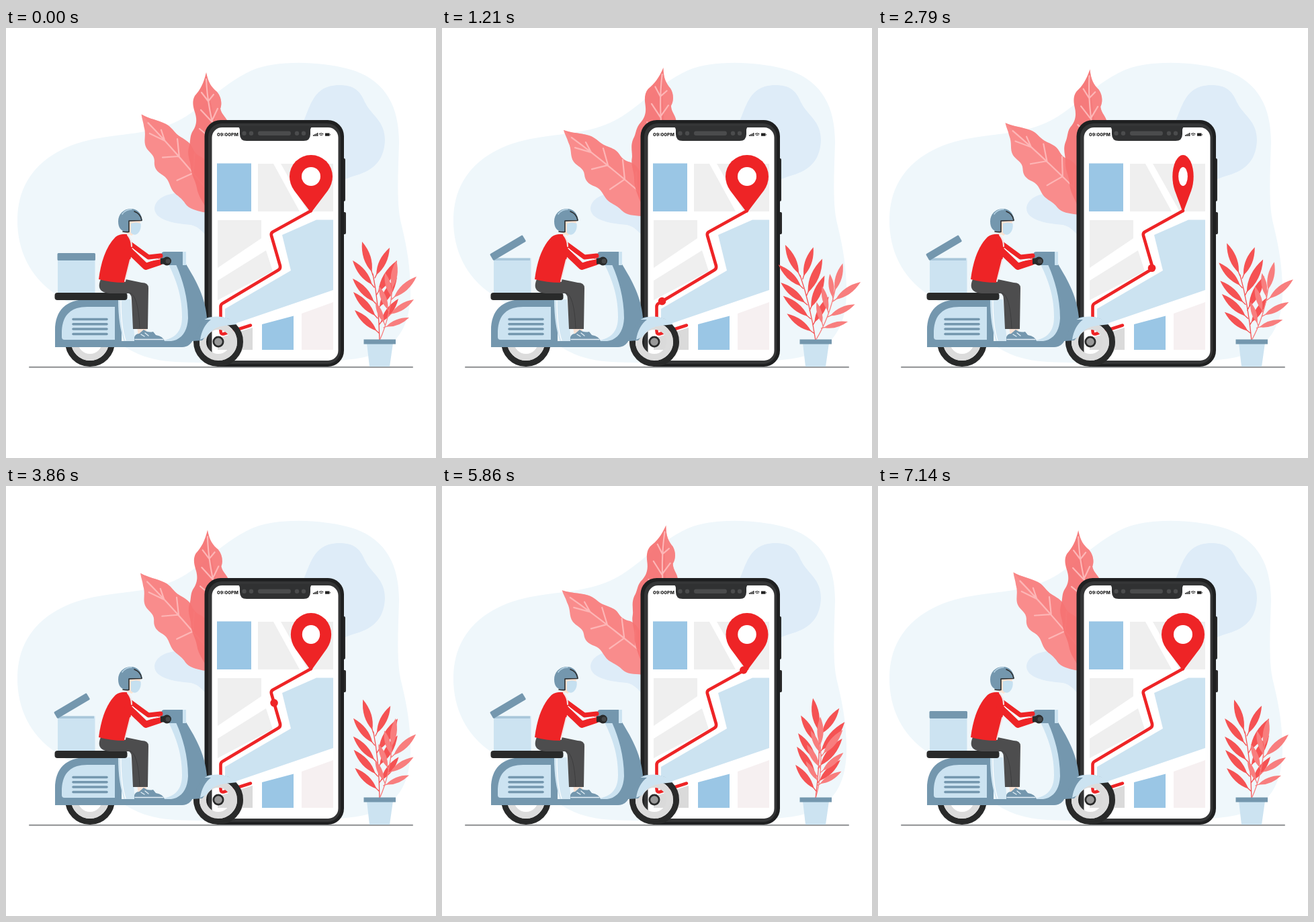
An HTML page for the animation above (7210 ms loop, 640 px wide and 640 px high).

```html
<!DOCTYPE html>
<html lang="en">
<head>
<meta charset="utf-8">
<title>Scooter delivery</title>
<style>
  html, body { margin: 0; width: 100%; height: 100%; overflow: hidden; background: #fff; }
  svg { display: block; width: 100%; height: 100%; }
  .steel { fill: #7497ae; }
  .sky { fill: #cce3f1; }
  .azure { fill: #9ac6e5; }
  .ink { fill: #292a2a; }
  .red { fill: #ee2426; }
  .tile { fill: #efefef; }
  .line { fill: none; stroke-linecap: round; stroke-linejoin: round; }
  .vein { stroke: #fdb6b6; stroke-width: 2.2; }
  .tyre { fill: none; stroke: #292a2a; stroke-width: 9; }
  .rim { fill: none; stroke: #dcdcdc; stroke-width: 10; }
</style>
</head>
<body>
<svg viewBox="0 0 640 640">
  <!-- backdrop -->
  <path fill="#eff7fb" d="M17 283C18 230 49 191 105 172C150 157 200 161 243 144C290 126 311 89 366 63C405 46 478 50 520 64C566 81 585 118 585 170C584 210 581 256 587 286C594 315 601 345 602 385C603 430 592 466 550 485C510 501 400 498 300 498C250 498 220 497 190 482C150 462 120 425 75 397C34 370 16 328 17 283Z"/>
  <path fill="#deecf8" d="M440 145C453 120 455 85 496 85C522 85 528 97 535 112C544 130 564 138 564 167C563 195 549 211 522 219C490 229 470 240 440 270L330 330C300 325 298 298 275 293C250 291 221 286 221 268C223 249 250 243 280 245C340 240 400 210 440 145Z"/>
  <path class="line" stroke="#8d8f91" stroke-width="2" d="M35 504.700H605"/>

  <!-- large leaves -->
  <g id="leafLeft">
    <path fill="#f98c8c" d="M181 152C195 157 206 156 219 160C229 163 233 170 241 174C250 178 259 180 264 188C269 196 274 198 281 200C290 204 294 212 300 222C312 238 325 255 325 275L297 280C285 279 275 279 268 272C261 264 252 262 246 256C239 248 238 240 228 236C217 232 213 227 212 218C211 208 201 206 196 199C190 190 194 182 188 170C186 163 183 159 181 152Z"/>
    <path fill="#f77f7f" opacity=".55" d="M181 152C195 157 206 156 219 160C229 163 233 170 241 174C250 178 259 180 264 188C269 196 274 198 281 200C290 204 294 212 300 222C312 238 325 255 325 275Q245 200 181 152Z"/>
    <path class="line vein" d="M193 163Q240 197 310 258M222 185L214 170M222 185L198 178M247 204L240 179M247 204L223 210M272 225L269 196M272 225L250 240M289 240L289 214"/>
  </g>
  <g id="leafRight">
    <path fill="#f67373" opacity=".94" d="M298 66C301 82 306 88 314 95C320 102 322 112 319 120C321 130 329 133 331 143C333 157 331 168 341 180C353 200 361 225 350 268C330 278 310 275 298 268C292 257 286 250 284 238C282 226 275 218 275 207C275 199 269 190 272 178C275 170 273 163 277 155C285 144 284 134 281 125C278 116 277 108 281 101C289 92 294 83 298 66Z"/>
    <path fill="#fa8a8a" opacity=".5" d="M298 66C301 82 306 88 314 95C320 102 322 112 319 120C321 130 329 133 331 143C333 157 331 168 341 180L350 240Q306 150 298 66Z"/>
    <path class="line vein" d="M298 76Q300 120 315 170T348 250M301 109L291 96M301 109L309 99M306 139L290 122M306 139L315 120M316 173L288 150M316 173L325 148"/>
  </g>

  <!-- phone -->
  <path class="ink" d="M500 194h3q2 0 2 2v60q0 2-2 2h-3zM500 274h4q2 0 2 2v29q0 2-2 2h-4z"/>
  <rect x="295.500" y="137" width="207.500" height="367" rx="24" fill="#1f2021"/>
  <rect x="301" y="142" width="197" height="358" rx="20" fill="#343536"/>
  <rect x="306.500" y="148" width="188" height="347" rx="15" fill="#fff"/>
  <path fill="#303132" d="M344 146H457Q453 148 453 152V158Q453 168 443 168H358Q348 168 348 158V152Q348 148 344 146Z"/>
  <g fill="#4b4c4d">
    <circle cx="354.500" cy="156.700" r="3.200"/><circle cx="365" cy="156.700" r="3.200"/>
    <rect x="375" y="153.500" width="49" height="6.500" rx="3.200"/>
    <circle cx="433" cy="156.700" r="3.200"/><circle cx="443" cy="156.700" r="3.200"/>
  </g>
  <text x="314" y="161" font-family="Inter, sans-serif" font-weight="800" font-size="6.800" fill="#222">09:00PM</text>
  <path fill="#222" d="M457 159h1.400v2h-1.400zM459 158h1.400v3h-1.400zM461 157h1.400v4h-1.400zM463 156h1.400v5h-1.400zM475 156.500h6.500v4.300h-6.500zM482 158h.8v1.500h-.8z"/>
  <path class="line" stroke="#222" stroke-width="1.100" d="M466.500 157.800q2.700-2 5.400 0M467.800 159.500q1.400-1 2.800 0"/>

  <!-- map -->
  <path class="azure" d="M314 201.500h51v71.500h-51zM381 441L428 428.500V479H381Z"/>
  <path class="tile" d="M375 202H398L437 273H375ZM409 202H487V273H449ZM315 286H380V313L315 357ZM315 376L387 331L397 362L315 405Z"/>
  <path class="sky" d="M411 308L462 285.500H487V390L326 445V418L424 361Z"/>
  <path fill="#f6f0f1" d="M440 425L487 408V479H440Z"/>
  <path fill="#dadada" d="M315 462L367 446V479H315Z"/>
  <path class="line" stroke="#ee2426" stroke-width="4.600" d="M364 442.500L325 455Q319.500 457 319.500 451V415Q319.500 411 323 409.500L405 360.500Q409 358 408 354L395 309Q394 305.500 397 303.500L454 272"/>
  <circle id="dot" class="red" r="5.800"/>
  <g id="pin">
    <path class="red" d="M454 275L429 242Q422 232 422 221A32 32 0 0 1 486 221Q486 232 479 242Z"/>
    <circle cx="454" cy="221" r="14" fill="#fff"/>
  </g>

  <!-- potted plant -->
  <g id="stemLeft"></g>
  <g id="stemRight"></g>
  <path class="sky" d="M537 469H576L571 504H541Z"/>
  <rect class="steel" x="532.500" y="463.500" width="47.500" height="7"/>

  <!-- wheels: open rings -->
  <circle class="tyre" cx="125" cy="467" r="32.500"/>
  <circle class="rim" cx="125" cy="467" r="23"/>
  <circle class="tyre" cx="316" cy="467" r="32.500"/>
  <circle class="rim" cx="316" cy="467" r="23"/>
  <circle class="ink" cx="316" cy="467" r="8.500"/>
  <circle cx="316" cy="467" r="5.800" fill="#999"/>

  <!-- scooter -->
  <path class="steel" d="M277 466C279 444 289 431 306 430L304 451L292 465Z"/>
  <path class="sky" d="M295 434C312 426 332 429 344 441L326 443C312 445 305 450 298 460L289 464C291 450 297 440 305 434Z"/>
  <path class="steel" d="M73 475V450C73 420 90 404 120 404H172V466H190V475Z"/>
  <path class="sky" d="M83 460V451C84 426 98 415 121 415H162V464H87Q83 464 83 460Z"/>
  <path class="line" stroke="#7497ae" stroke-width="3.600" d="M100 433.500h50M100 440.700h50M100 448h50M100 455.500h50"/>
  <path fill="#d3e7f3" d="M167 404H186L192 467H176C170 450 167 430 167 404Z"/>
  <path class="line" stroke="#fff" stroke-width="1.200" d="M171 406Q171 445 178 465"/>
  <path class="steel" d="M247 350H267C279 370 296 396 299 431C290 437 285 448 280 460Q275 475 262 475H170V466H240C262 464 268 448 268 428Z"/>
  <path class="sky" d="M242 352H253C262 372 271 400 271 432C270 453 260 466 242 466H228C252 463 262 452 262 430C262 400 254 376 242 352Z"/>
  <path class="steel" d="M231 338Q231 333 236 333H264V353H243Q231 350 231 338Z"/>
  <path class="sky" d="M263 333h5v20h-5z"/>

  <!-- box and seat -->
  <path class="sky" d="M77 342.500H132.500V395H77Z"/>
  <path fill="#a9c7da" d="M77 342.500H131V346H77Z"/>
  <rect id="lid" class="steel" x="76.500" y="335" width="56.500" height="11" rx="1.500"/>
  <rect class="ink" x="72.500" y="394" width="108" height="11" rx="4"/>

  <!-- rider -->
  <path fill="#f8e2d4" d="M195 445H209V453L197 458Z"/>
  <path class="steel" d="M191 466V460Q193 455 198 455L205 449Q211 454 219 452L223 457Q234 459 236 466Z"/>
  <path class="line" stroke="#e4f0f7" stroke-width="1.300" d="M192 463.500H234M201 456l5 3M207 454l5 4"/>
  <path fill="#4d4d4e" d="M141 374C135 388 141 395 158 395H183Q187 397 187 405L189 448H211L212 387Q212 379 202 379L178 374Z"/>
  <path class="line" stroke="#3d3d3e" stroke-width="1" d="M184 394Q197 397 199 447"/>
  <path class="line" stroke="#ee2426" stroke-width="7" d="M186 322L212 341L230 339"/>
  <path class="red" d="M163 311Q170 306 180 307L187 318L189 330L176 379Q156 379 138 374C141 350 148 326 163 311Z"/>
  <path class="line" stroke="#f4e6e6" stroke-width="2" d="M181 308Q187 315 187 325M185 345L177 377"/>
  <path class="line" stroke="#ee2426" stroke-width="10" d="M181 329L208 355L229 348"/>
  <path class="line" stroke="#fff" stroke-width="1.200" d="M188 328L211 347L229 344"/>
  <circle class="ink" cx="239.500" cy="347" r="6.500"/>
  <path class="ink" d="M230 342.500h10v9h-10z"/>
  <circle cx="241" cy="347" r="3.500" fill="#454647"/>
  <path fill="#fbe3d2" d="M182 286H200L199 300L187 309L180 306Z"/>
  <path fill="#c5e0f0" d="M186 291Q193 288 200.500 291Q202 300 196 306Q191 310 186 305Z"/>
  <path class="steel" d="M203 286C201 274 194 269 186 269C174 269 167 278 167 288C167 298 172 304 183 304V288Z"/>
  <path class="line" stroke="#b9d5e6" stroke-width="1.600" d="M173 277Q178 270 187 270"/>
  <path class="line" stroke="#2d2e2f" stroke-width="1.600" d="M174 303Q178 304 183 303.500V287L202 286.500C201 279 197 275 191 273"/>
</svg>
<script>
  const LOOP = 7210;
  const byId = id => document.getElementById(id);
  const clamp = v => Math.min(1, Math.max(0, v));
  const ease = v => (1 - Math.cos(Math.PI * clamp(v))) / 2;

  // Almond-shaped leaflet that starts a little way out along its stalk.
  function leaflet([bx, by, tx, ty]) {
    const dx = tx - bx, dy = ty - by;
    const sx = bx + dx * .1, sy = by + dy * .1;
    const mx = bx + dx * .52, my = by + dy * .52;
    const nx = -dy * .2, ny = dx * .2;
    return `M${sx} ${sy}Q${mx + nx} ${my + ny} ${tx} ${ty}Q${mx - nx} ${my - ny} ${sx} ${sy}`;
  }

  function growStem(id, color, stem, leaflets) {
    const stalks = leaflets.map(([bx, by, tx, ty]) => `M${bx} ${by}L${(bx + tx) / 2} ${(by + ty) / 2}`);
    byId(id).innerHTML =
      `<path class="line" stroke="${color}" stroke-width="1.300" d="${stem}${stalks.join("")}"/>` +
      `<path fill="${color}" d="${leaflets.map(leaflet).join("")}"/>`;
  }

  growStem("stemLeft", "#f55253", "M556 465Q555 410 546 366", [
    [546, 368, 530, 318], [549, 372, 571, 327], [551, 398, 582, 346],
    [553, 420, 582, 371], [555, 442, 584, 403], [548, 386, 516, 346],
    [551, 411, 516, 373], [553, 432, 517, 393], [555, 454, 519, 420]
  ]);
  growStem("stemRight", "#f87e7e", "M556 465Q572 430 575 385", [
    [574, 392, 581, 346], [574, 404, 611, 370], [569, 428, 607, 404],
    [562, 446, 600, 431], [574, 402, 564, 364], [570, 423, 555, 384],
    [564, 442, 550, 408]
  ]);

  const route = [[327, 407], [408, 357], [394.5, 305.5], [454, 271]];
  const TRIP_START = 1200, LEG = 1600, TRIP_END = TRIP_START + 3 * LEG;

  function rotate(id, angle, x, y) {
    byId(id).setAttribute("transform", `rotate(${angle} ${x} ${y})`);
  }

  function draw(t) {
    const sway = (1 - Math.cos(4 * Math.PI * t / LOOP)) / 2;
    rotate("leafLeft", 9.8 - 13 * sway, 329, 260);
    rotate("leafRight", 13 * sway, 354, 245);

    const lean = t < LOOP / 2 ? 10 * sway : -10 * sway;
    rotate("stemLeft", -lean, 556, 465);
    rotate("stemRight", lean, 556, 465);

    const open = ease(t / 1100) - ease((t - 6050) / 1100);
    rotate("lid", -30.5 * open, 77, 346);

    const trip = clamp((t - TRIP_START) / (TRIP_END - TRIP_START));
    const turn = Math.cos(2 * Math.PI * trip);
    byId("pin").setAttribute("transform", `translate(454 0) scale(${turn} 1) translate(-454 0)`);

    const leg = Math.min(2, Math.floor(trip * 3)), part = trip * 3 - leg;
    const [from, to] = [route[leg], route[leg + 1]];
    const [x, y] = from.map((v, i) => v + (to[i] - v) * part);
    const size = clamp((t - 1000) / 200) * clamp((TRIP_END + 200 - t) / 200);
    byId("dot").setAttribute("transform", `translate(${x} ${y}) scale(${size})`);
  }

  function tick() {
    draw(performance.now() % LOOP);
    requestAnimationFrame(tick);
  }
  tick();
</script>
</body>
</html>
```
